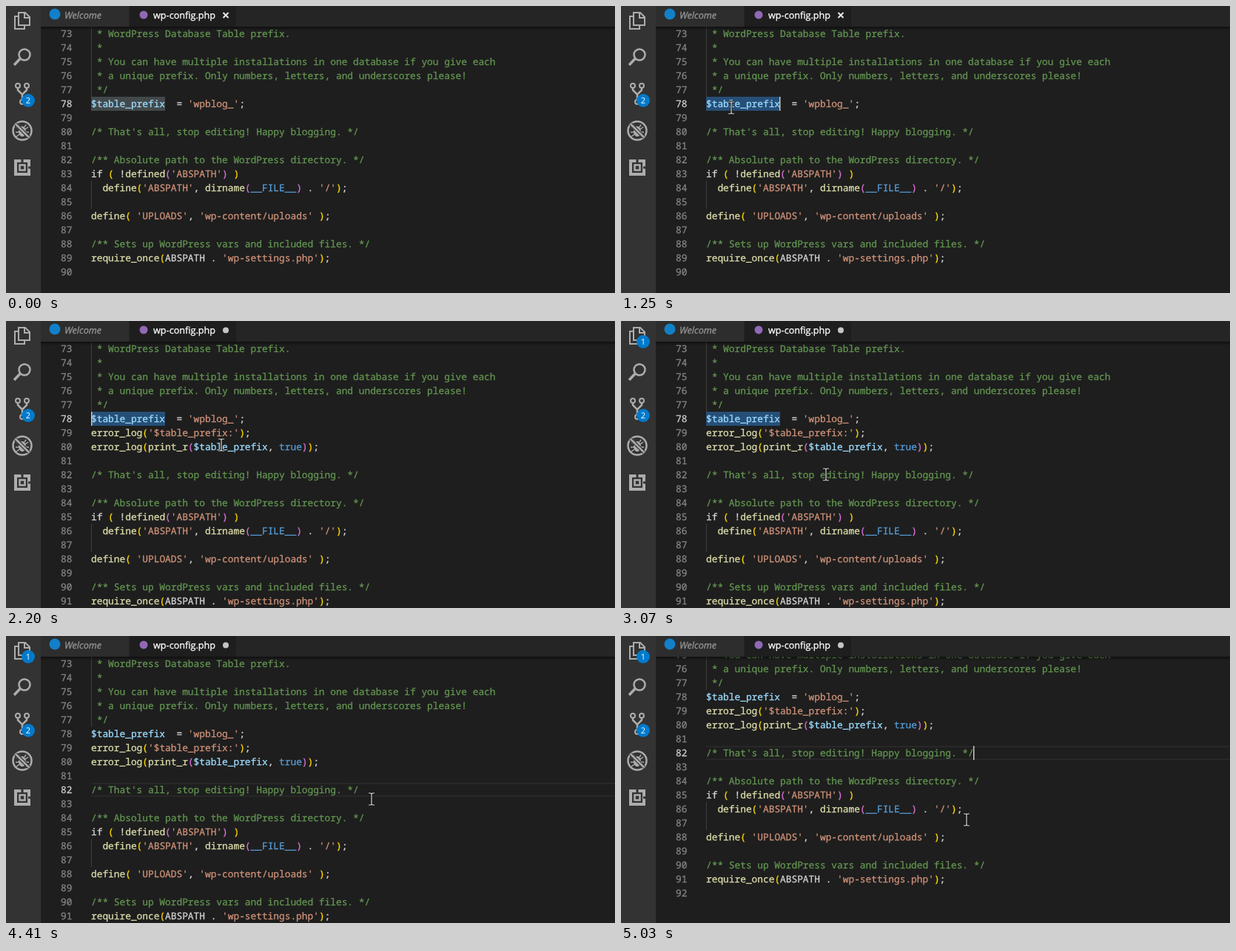
An HTML page that plays this animation: 823 px wide and 389 px high, repeating every 5130 ms.

```html
<!DOCTYPE html>
<html lang="en">
<head>
<meta charset="utf-8">
<title>Editor</title>
<style>
html, body { margin: 0; width: 100%; height: 100%; overflow: hidden; background: #1e1e1e; }
svg { display: block; width: 100vw; height: 100vh; }
text { text-rendering: geometricPrecision; white-space: pre; }
.code { font: 12.83px "Noto Sans Mono", "DejaVu Sans Mono", monospace; color: #d4d4d4; }
.code text, .code tspan { fill: currentColor; stroke: currentColor; stroke-width: .3px; }
.number { color: #858585; text-anchor: end; }
.number.active { color: #d0d0d0; }
.comment { color: #629450; }
.string { color: #ce9178; }
.call { color: #dcdcaa; }
.variable { color: #9cdcfe; }
.constant { color: #569cd6; }
.bracket0 { color: #ffd700; }
.bracket1 { color: #da70d6; }
.guide { fill: #404040; }
.tab { font: 12.65px "Open Sans", "Noto Sans", sans-serif; fill: #fff; stroke: #fff; stroke-width: .3px; }
.preview { font-style: italic; fill: #969696; stroke: #969696; }
.badge { font: 11px "Open Sans", "Noto Sans", sans-serif; fill: #fff; text-anchor: middle; }
.icon { fill: none; stroke: #adadad; stroke-width: 2; }
</style>
</head>
<body>
<svg viewBox="0 0 823 389">
  <defs>
    <linearGradient id="shade" x2="0" y2="1">
      <stop stop-color="#000" stop-opacity=".5"/>
      <stop offset="1" stop-color="#000" stop-opacity="0"/>
    </linearGradient>
  </defs>
  <rect width="823" height="389" fill="#1e1e1e"/>

  <g id="editor">
    <path id="currentLine" d="M115 200h708M115 217h708" stroke="#282828" stroke-width="2"/>
    <rect id="selection" x="115" y="123" width="100" height="19"/>
    <g id="before" class="code"></g>
    <g id="after" class="code"></g>
    <path id="fold" d="M99.5 223.5h9v9h-9zM101.5 228h5" fill="none" stroke="#8a8a8a"/>
    <rect id="caret" width="1.5" height="19" fill="#c8c9c7"/>
  </g>

  <rect x="47" y="28" width="776" height="5" fill="url(#shade)"/>
  <rect x="47" width="776" height="28" fill="#252526"/>
  <rect x="47" width="119" height="28" fill="#2d2d2d"/>
  <rect x="167" width="144" height="28" fill="#1e1e1e"/>
  <circle cx="66" cy="11" r="7.5" fill="#1280c8"/>
  <circle cx="186" cy="12" r="5.5" fill="#9168b5"/>
  <text class="tab preview" x="79" y="17">Welcome</text>
  <text class="tab" x="199" y="17">wp-config.php</text>
  <path id="close" d="M293.5 9l7 7m0-7l-7 7" stroke="#e8e8e8" stroke-width="2"/>
  <circle id="dirty" cx="297" cy="12.5" r="4" fill="#c5c5c5"/>

  <rect width="47" height="389" fill="#333"/>
  <g class="icon">
    <path d="M17 9h9l6 6v11H17zM25 9v7h7M16 14h-4v17h13v-4"/>
    <circle cx="25" cy="66" r="7.5" stroke-width="2.5"/>
    <path d="M19 71.5l-8 8.5" stroke-width="3.5"/>
    <circle cx="16" cy="108" r="3"/>
    <circle cx="28" cy="108" r="3"/>
    <circle cx="22" cy="130" r="3"/>
    <path d="M16 111v3l6 6 6-6v-3M22 120v7" stroke-width="2.5"/>
    <circle cx="22" cy="169" r="12.5" stroke-width="2.5"/>
    <ellipse cx="22" cy="170" rx="4" ry="6" fill="#adadad"/>
    <path d="M14 164l4 3m-5 4h5m-4 6l4-3m12-10l-4 3m5 4h-5m4 6l-4-3M19 164l-2-3m8 3l2-3" stroke-width="1.5"/>
    <path d="M13 160l18 18" stroke="#333" stroke-width="5"/>
    <path d="M13 160l18 18" stroke-width="2.5"/>
    <path d="M13 210h18v18h-18z" stroke-width="4"/>
    <path d="M18.5 215.5h7v7h-7z" stroke-width="2.5"/>
    <path d="M22 207v6M30 219h4" stroke="#333" stroke-width="3"/>
  </g>
  <g id="unsaved">
    <circle cx="30" cy="28" r="9" fill="#007acc"/>
    <text class="badge" x="30" y="32">1</text>
  </g>
  <circle cx="30" cy="128" r="9" fill="#007acc"/>
  <text class="badge" x="30" y="132">2</text>

  <g id="pointer">
    <g id="beam" fill="none">
      <path d="M-4 -8h3l1 1 1-1h3M0 -7V7M-4 8h3l1-1 1 1h3" stroke="#111" stroke-width="3"/>
      <path d="M-4 -8h3l1 1 1-1h3M0 -7V7M-4 8h3l1-1 1 1h3" stroke="#ddd" stroke-width="1.2"/>
    </g>
    <path id="arrow" d="M0 0V16.5L3.8 13 6.2 18.5 8.7 17.4 6.3 12H11.5Z" fill="#fff" stroke="#000"/>
  </g>
</svg>
<script>
const LOOP = 5130, TOP = 28, ROW = 19, LEFT = 115, FIRST = 73;
const STEP = 77;
const $ = id => document.getElementById(id);

const lines = [
  " * WordPress Database Table prefix.",
  " *",
  " * You can have multiple installations in one database if you give each",
  " * a unique prefix. Only numbers, letters, and underscores please!",
  " */",
  "$table_prefix  = 'wpblog_';",
  "",
  "/* That's all, stop editing! Happy blogging. */",
  "",
  "/** Absolute path to the WordPress directory. */",
  "if ( !defined('ABSPATH') )",
  "  define('ABSPATH', dirname(__FILE__) . '/');",
  "  ",
  "define( 'UPLOADS', 'wp-content/uploads' );",
  "",
  "/** Sets up WordPress vars and included files. */",
  "require_once(ABSPATH . 'wp-settings.php');",
  ""
];
const logged = [
  "error_log('$table_prefix:');",
  "error_log(print_r($table_prefix, true));"
];

const span = (kind, text) => `<tspan class="${kind}">${text}</tspan>`;

function colour(line) {
  if (/^ ?(\/\*|\*)/.test(line)) return span("comment", line);
  let depth = 0;
  return line.replace(/'[^']*'|\$\w+|__FILE__|true|\w+(?=\()|[()]/g, token => {
    if (token === "(") return span("bracket" + depth++ % 2, token);
    if (token === ")") return span("bracket" + --depth % 2, token);
    if (token[0] === "'") return span("string", token);
    if (token[0] === "$") return span("variable", token);
    return span(/^(__FILE__|true)$/.test(token) ? "constant" : "call", token);
  });
}

function drawLine(line, i) {
  const y = TOP + i * ROW, number = FIRST + i;
  const guide = line[0] === " "
    ? `<rect class="guide" x="${LEFT}" y="${y}" width="1" height="${ROW}"/>` : "";
  return `${guide}<text class="number" data-line="${number}" x="89.4" y="${y + 14}">${number}</text>` +
    `<text x="${LEFT}" y="${y + 14}">${colour(line)}</text>`;
}

$("before").innerHTML = lines.map(drawLine).join("");
$("after").innerHTML = [...lines.slice(0, 6), ...logged, ...lines.slice(6)].map(drawLine).join("");
const numbers = document.querySelectorAll(".number");

// Pointer moves: start, time of the last step, end x, end y
const moves = [
  [100, 100, 611, 358], [170, 170, 437, 303], [250, 250, 452, 310],
  [410, 870, 149, 139], [950, 950, 148.5, 137.5], [1410, 1490, 121, 139],
  [1570, 1730, 109, 134], [1890, 2200, 291, 168], [2280, 2280, 350, 167],
  [2450, 2530, 410, 172], [2610, 2920, 314, 202], [2990, 3070, 277, 208],
  [3230, 3690, 503, 205], [3860, 3860, 509, 210], [3935, 4010, 503, 201],
  [4180, 4250, 493.5, 221], [4490, 4890, 472, 249], [4960, 5030, 467, 249]
];

function pointerAt(t) {
  let x = 0, y = 0;
  for (const [start, end, toX, toY] of moves) {
    if (t < start) break;
    const steps = Math.round((end - start) / STEP) + 1;
    const gap = steps > 1 ? (end - start) / (steps - 1) : 1;
    const u = Math.min(1, (Math.floor((t - start) / gap + 1e-6) + 1) / steps);
    const eased = u * u * (3 - 2 * u);
    x += (toX - x) * eased;
    y += (toY - y) * eased;
  }
  return [x, y];
}

const between = (t, from, to) => t >= from && t < to;
const show = (id, on) => $(id).setAttribute("display", on ? "inline" : "none");

function draw(t) {
  const edited = t >= 2040, clicked = t >= 3860, inGutter = between(t, 1570, 1890);

  $("editor").setAttribute("transform", `translate(0 ${t >= 4960 ? -50 : 0})`);
  show("before", !edited);
  show("after", edited);
  show("close", !edited);
  show("dirty", edited);
  show("unsaved", t >= 2530);
  show("fold", inGutter);
  show("selection", !clicked);
  show("currentLine", clicked);
  $("selection").setAttribute("fill", t < 1100 ? "#43494b" : "#264f78");
  const active = clicked ? "82" : "78";
  numbers.forEach(n => n.classList.toggle("active", n.dataset.line === active));

  show("caret", between(t, 1250, 2605) || between(t, 3230, 3690) ||
    between(t, 3860, 4410) || t >= 4890);
  $("caret").setAttribute("x", clicked ? 476 : t < 1570 ? 214 : LEFT);
  $("caret").setAttribute("y", clicked ? 199 : 123);

  show("pointer", t >= 100);
  show("beam", !inGutter);
  show("arrow", inGutter);
  $("pointer").setAttribute("transform", `translate(${pointerAt(t).map(Math.round).join(" ")})`);
}

const begin = performance.now();
function tick() {
  draw((performance.now() - begin) % LOOP);
  requestAnimationFrame(tick);
}
tick();
</script>
</body>
</html>
```
